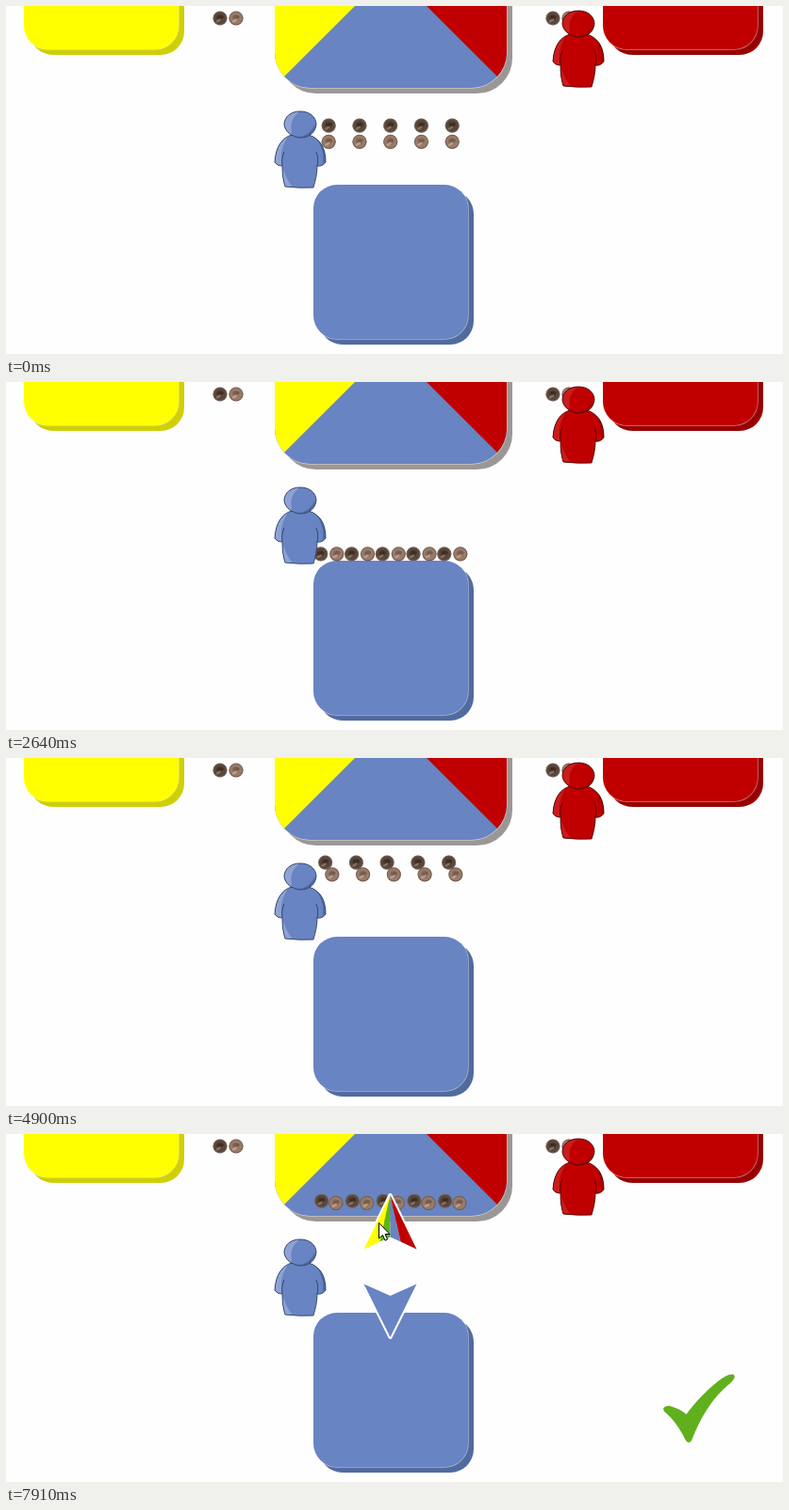
An HTML page with a canvas that plays this animation: 824x370 px, repeating every 7.99 s.

```html
<!DOCTYPE html>
<html lang="en">
<head>
<meta charset="utf-8">
<title>Token table</title>
<style>
html, body { margin: 0; width: 100%; height: 100%; overflow: hidden; background: #fefefe; }
canvas { display: block; width: 824px; height: 370px; }
</style>
</head>
<body>
<canvas id="stage" width="824" height="370"></canvas>
<script>
const ctx = document.getElementById('stage').getContext('2d');
const LOOP = 7990;
const MOVE = 1500;
const BLUE = '#6884c2', YELLOW = '#ffff00', RED = '#c00000', GREEN = '#5fb512';

const clamp = v => Math.max(0, Math.min(1, v));
const mix = (a, b, p) => a + (b - a) * p;

// cubic-bezier(.25, .1, .25, 1), solved by bisection
function ease(x) {
  if (x <= 0) return 0;
  if (x >= 1) return 1;
  let lo = 0, hi = 1;
  for (let i = 0; i < 24; i++) {
    const s = (lo + hi) / 2;
    const bx = 0.75 * s * (1 - s) * (1 - s) + 0.75 * s * s * (1 - s) + s * s * s;
    if (bx < x) lo = s; else hi = s;
  }
  const s = (lo + hi) / 2;
  return 0.3 * s * (1 - s) * (1 - s) + 3 * s * s * (1 - s) + s * s * s;
}
const move = (t, start) => ease((t - start) / MOVE);

function poly(points, fill) {
  ctx.beginPath();
  points.forEach(([x, y], i) => i ? ctx.lineTo(x, y) : ctx.moveTo(x, y));
  ctx.closePath();
  if (fill) {
    ctx.fillStyle = fill;
    ctx.fill();
  }
}

function oval(x, y, rx, ry, fill, turn = 0) {
  ctx.beginPath();
  ctx.ellipse(x, y, rx, ry, turn, 0, Math.PI * 2);
  ctx.fillStyle = fill;
  ctx.fill();
}

// Rounded slab with an offset shadow and a faint light rim
function slab(x, y, w, h, r, fill, shade) {
  ctx.beginPath();
  ctx.roundRect(x + 6, y + 6, w, h, r);
  ctx.fillStyle = shade;
  ctx.fill();
  ctx.beginPath();
  ctx.roundRect(x, y, w, h, r);
  ctx.strokeStyle = 'rgba(255,255,255,.5)';
  ctx.lineWidth = 1.4;
  ctx.stroke();
  ctx.fillStyle = fill;
  ctx.fill();
}

const tile = (x, y, fill, shade) => slab(x, y, 164, 164, 25, fill, shade);

function board() {
  const x = 285, y = -163, w = 246, h = 250, r = 37.5;
  const cx = x + w / 2, cy = y + h / 2, far = 150;
  slab(x, y, w, h, r, BLUE, '#9b9797');
  ctx.save();
  ctx.beginPath();
  ctx.roundRect(x, y, w, h, r);
  ctx.clip();
  poly([[cx, cy], [cx - far, cy - far], [cx - far, cy + far]], YELLOW);
  poly([[cx, cy], [cx + far, cy - far], [cx + far, cy + far]], RED);
  ctx.restore();
}

function coin(x, y, light) {
  const [rim, face, core, glint] = light
    ? ['#78645a', '#9a7b69', '#765b4c', '#b99f90']
    : ['#66564d', '#5a473b', '#3c2e24', '#85705f'];
  const g = ctx.createRadialGradient(x - 1, y - 1, 1, x, y, 7.6);
  g.addColorStop(0, core);
  g.addColorStop(0.5, face);
  g.addColorStop(0.8, face);
  g.addColorStop(1, rim);
  oval(x, y, 7.6, 7.6, g);
  oval(x - 1.5, y + 2.5, 3, 1.3, glint, -0.5);
  oval(x + 1.8, y - 1.6, 2, 1.5, core, 0.5);
  ctx.beginPath();
  ctx.arc(x, y, 7, 0, Math.PI * 2);
  ctx.strokeStyle = light ? 'rgba(70,50,40,.4)' : 'rgba(160,140,125,.4)';
  ctx.lineWidth = 0.8;
  ctx.stroke();
}

const bodyPath = new Path2D('M-9 11 C-19 14 -26 23 -27 40 C-25 43 -22 44 -19 44 ' +
  'C-19 53 -18 60 -16 66 Q0 68 14 67 C16 60 18 53 18 44 C21 45 25 43 27 40 ' +
  'C27 26 22 15 9 11 Z');
const headPath = new Path2D('M-17 0 C-17 -8 -10 -14 0 -14 C10 -14 17 -8 17 0 ' +
  'C16 9 9 14 0 14 C-9 13 -16 8 -17 0 Z');
const bodyLight = new Path2D('M-13 13 C-21 18 -26 25 -27 40 C-25 43 -22 44 -19 44 ' +
  'C-22 32 -19 22 -13 13 Z M-19 44 C-19 53 -18 60 -16 66 L-8 67 C-13 60 -17 53 -19 44 Z');
const bodyDark = new Path2D('M17 16 C22 21 25 30 24 42 L27 40 C27 27 23 19 17 16 Z');
const headLight = new Path2D('M-17 0 C-17 -8 -10 -14 0 -14 C-8 -9 -11 -2 -9 10 C-14 8 -17 4 -17 0 Z');
const headDark = new Path2D('M17 -2 C16 9 9 14 -1 13.5 C8 11 13 6 17 -2 Z');
const armLines = new Path2D('M-19 44 C-20 39 -19 34 -17 29 M18 44 C19 39 19 34 17 29');

function person(x, y, fill, light, dark, line) {
  ctx.save();
  ctx.translate(x, y);
  ctx.strokeStyle = line;
  ctx.lineWidth = 0.9;
  for (const [shape, hi, lo] of [[bodyPath, bodyLight, bodyDark], [headPath, headLight, headDark]]) {
    ctx.fillStyle = fill;
    ctx.fill(shape);
    ctx.fillStyle = light;
    ctx.fill(hi);
    ctx.fillStyle = dark;
    ctx.fill(lo);
    ctx.stroke(shape);
    if (shape === bodyPath) ctx.stroke(armLines);
  }
  ctx.restore();
}

// White rim that stays outside the fill drawn over it
function rim(points) {
  poly(points);
  ctx.strokeStyle = '#fff';
  ctx.lineWidth = 4;
  ctx.lineJoin = 'round';
  ctx.stroke();
}

function arrows() {
  const x = 407.5, tip = [x, 65];
  const base = [[379.5, 122.5], [396.5, 114.5], [x, 109.5], [418.5, 114.5], [435.5, 122.5]];
  rim([tip, base[0], base[2], base[4]]);
  [YELLOW, GREEN, BLUE, RED].forEach((c, i) => poly([tip, base[i], base[i + 1]], c));
  const down = [[x, 216], [379.5, 159.5], [x, 172], [435.5, 159.5]];
  rim(down);
  poly(down, BLUE);
}

const checkPath = new Path2D('M697 292 C699 289 702 288.5 705 289.5 C711 291 717 294 721.5 298 ' +
  'C730 286 747 268 759 260 C764 257 769 254.5 772 256 C774 259 771 262 768 265 ' +
  'C748 281 736 303 727 326 Q724 330 721 326 C715 314 708 303 698 295 Z');

function check() {
  ctx.fillStyle = '#60b01e';
  ctx.fill(checkPath);
}

function cursor(t) {
  const p = 1 - Math.pow(1 - clamp((t - 6050) / 740), 2.3), q = 1 - p;
  const bend = (a, b, c) => a * q * q + 2 * b * p * q + c * p * p;
  ctx.save();
  ctx.translate(bend(242, 298, 395.5), bend(400, 216, 94.5));
  poly([[0, 0], [0, 16.5], [4, 13], [6.5, 18.7], [9, 17.6], [6.6, 12], [11.5, 12]], '#fff');
  ctx.strokeStyle = '#000';
  ctx.lineWidth = 1;
  ctx.lineJoin = 'miter';
  ctx.stroke();
  ctx.restore();
}

function coins(t) {
  // spread: sideways, pair: up and down; 0 = two rows of five, 1 = one row of ten
  let spread, pair, rowY = 63;
  if (t < 4200) {
    spread = pair = move(t, 325);
    rowY = mix(218.5, 63, move(t, 2385));
  } else if (t < 6900) {
    spread = 1 - move(t, 4400);
    pair = 1 - move(t, 4225);
  } else {
    spread = move(t, 6990);
    pair = move(t, 7040);
  }
  for (let i = 0; i < 5; i++) {
    const x = 342.2 + 32.75 * i;
    coin(mix(x, x - 8.4, spread), mix(127.2, rowY, pair), false);
    coin(mix(x, x + 8.6, spread), mix(144.3, rowY, pair), true);
  }
}

function draw(t) {
  ctx.fillStyle = '#fefefe';
  ctx.fillRect(0, 0, 824, 370);
  tile(19, -118, YELLOW, '#cfcf08');
  tile(633, -118, RED, '#980000');
  tile(326, 190, BLUE, '#526b9f');
  board();
  for (const x of [227, 580]) {
    coin(x, 13, false);
    coin(x + 17, 13, true);
  }
  coins(t);
  person(607, 19, RED, '#c91c1c', '#a80000', '#4a0808');
  person(312, 126, BLUE, '#8ea3d4', '#5069a5', '#2f3f66');
  if (t >= 5740) arrows();
  if (t >= 6960) check();
  if (t >= 6080) cursor(t);
}

const begin = performance.now();
function tick() {
  draw((performance.now() - begin) % LOOP);
  requestAnimationFrame(tick);
}
tick();
</script>
</body>
</html>
```
